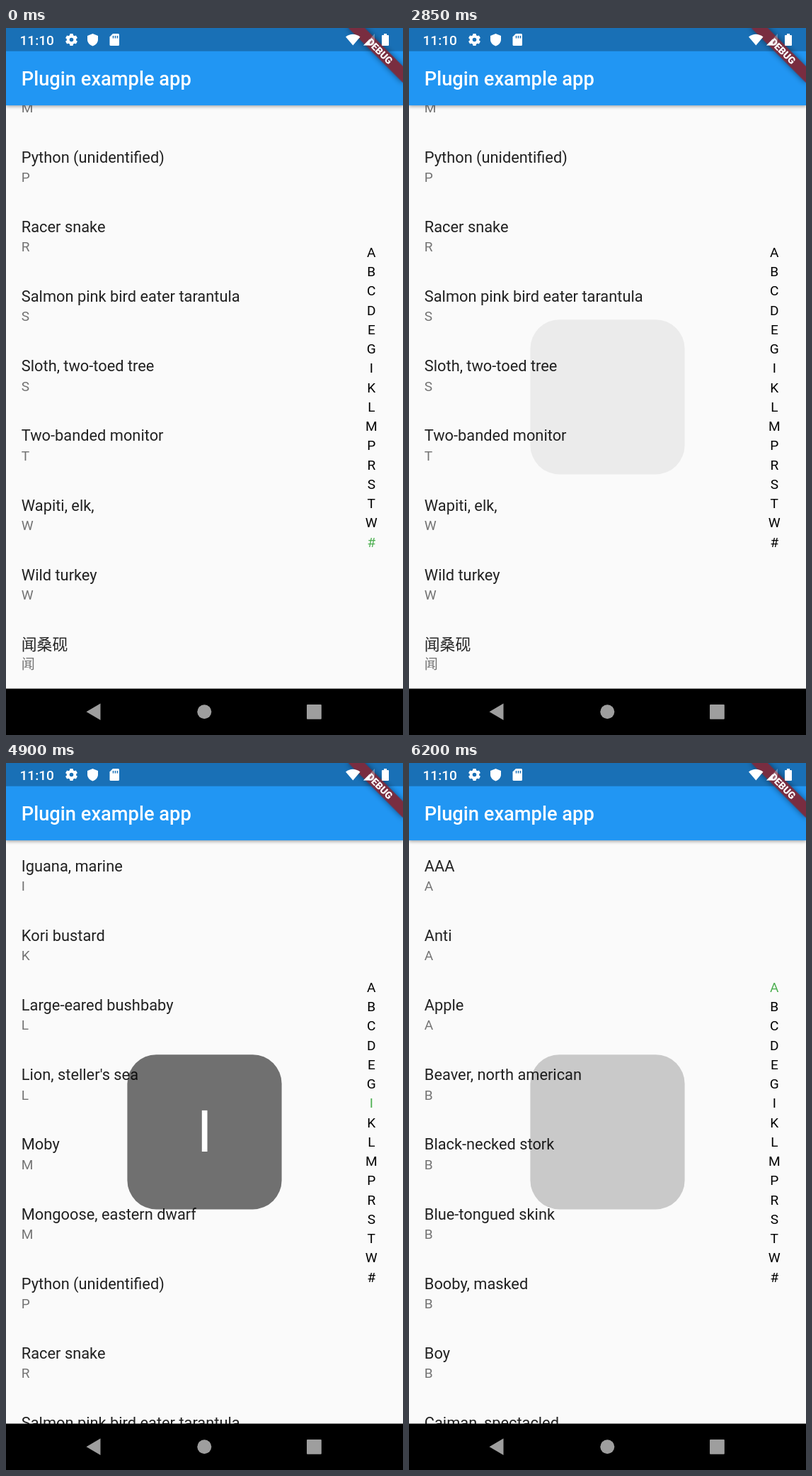
An HTML page for the animation above (6.25 s loop, 561 by 997 pixels).

```html
<!DOCTYPE html>
<html lang="zh-CN">
<head>
<meta charset="utf-8">
<title>Indexed list</title>
<style>
html, body { margin: 0; width: 100%; height: 100%; overflow: hidden; background: #fafafa; }
svg { display: block; width: 561px; height: 997px; }
text { font-family: Roboto, "Noto Sans CJK SC", "Noto Sans CJK", sans-serif; }
.title { font-size: 21.82px; fill: rgba(0,0,0,.87); }
.sub { font-size: 19.09px; fill: rgba(0,0,0,.54); }
.mid { text-anchor: middle; }
#index { font-size: 19.09px; }
#bar { filter: drop-shadow(0 2px 2px rgba(0,0,0,.3)); }
#band { filter: drop-shadow(0 0 4px rgba(0,0,0,.5)); }
</style>
</head>
<body>
<svg viewBox="0 0 561 997">
  <rect width="561" height="997" fill="#fafafa"/>
  <g id="list"></g>
  <g id="index" class="mid"></g>
  <g id="popup">
    <rect x="171.4" y="411.2" width="218.2" height="218.2" rx="41" fill="#000" fill-opacity=".55"/>
  </g>
  <text id="letter" class="mid" x="280.5" y="548.3" font-size="81.8" fill="#fff"></text>

  <rect id="bar" y="-9" width="561" height="118.1" fill="#2196f3"/>
  <rect width="561" height="32.7" fill="#1970b6"/>
  <text x="21.8" y="80.7" font-size="27.27" font-weight="500" fill="#fff">Plugin example app</text>

  <g transform="translate(561 0) rotate(45)">
    <rect id="band" x="-54.5" y="38.2" width="109" height="16.4" fill="#792d40"/>
    <text class="mid" y="51.3" font-size="13.9" font-weight="900" fill="#fff">DEBUG</text>
  </g>

  <g fill="#fff">
    <text x="19.5" y="24" font-size="19.09" font-weight="500">11:10</text>
    <circle cx="92.5" cy="16.5" r="4.8" fill="none" stroke="#fff" stroke-width="4"/>
    <g id="gear"></g>
    <path d="M122.5 8l7.5 3v5c0 4.5-3 8-7.5 9.500c-4.500-1.500-7.500-5-7.500-9.500v-5z"/>
    <path d="M151 8h7.500q1.500 0 1.500 1.500v14q0 1.500-1.500 1.500h-10.500q-1.500 0-1.500-1.500v-11z"/>
    <path d="M151.500 11v3.500m3-3.500v3.500m3-3.500v3.500" stroke="#1970b6" stroke-width="1.500"/>
    <path d="M480 12.500q10-7.500 20.500 0l-10.200 12z"/>
    <path d="M521 8v16.500h-16z" opacity=".3"/>
    <path d="M514 15.500v9h-9z"/>
    <path d="M534 8h4v2h2q1 0 1 1v13q0 1-1 1h-8q-1 0-1-1v-13q0-1 1-1h2z"/>
  </g>

  <rect y="931.6" width="561" height="65.400"/>
  <g fill="#9e9e9e">
    <path d="M113.500 964.300l20-11.800v23.600z"/>
    <circle cx="280.300" cy="964.300" r="10"/>
    <rect x="425" y="954" width="20.800" height="20.800" rx="1"/>
  </g>
</svg>
<script>
const LOOP = 6250, TOP = 109.09, ROW = 98.18, VIEW = 822.45, LAG = 45;
const FADE_IN = 2830, RELEASE = 6072, FADE = 200;
const letters = [...'ABCDEGIKLMPRSTW#'];
const names = `AAA|Anti|Apple|Beaver, north american|Black-necked stork|Blue-tongued skink|Booby, masked|Boy|\
Caiman, spectacled|Cat|Cereopsis goose|Cherry|Cliffchat, mocking|Common ringtail|Crane, wattled|Dog, raccoon|\
Eastern fox squirrel|Gray langur|Iguana, marine|Kori bustard|Large-eared bushbaby|Lion, steller's sea|Moby|\
Mongoose, eastern dwarf|Python (unidentified)|Racer snake|Salmon pink bird eater tarantula|\
Sloth, two-toed tree|Two-banded monitor|Wapiti, elk,|Wild turkey|闻桑砚`.split('|');

// Letter under the finger from each moment on
const drag = [[0, '#'], [FADE_IN, ''], [2930, '#'], [3030, 'W'], [3100, 'T'], [3180, 'S'], [3270, 'R'],
  [3370, 'P'], [3530, 'M'], [3860, 'L'], [3980, 'K'], [4100, 'I'], [4430, 'P'], [4620, 'M'], [4700, 'L'],
  [4770, 'K'], [4840, 'I'], [4920, 'G'], [4990, 'E'], [5070, 'D'], [5160, 'C'], [5480, 'B'], [5700, 'A']];

const $ = id => document.getElementById(id);
function add(parent, tag, attrs, text = '') {
  const el = document.createElementNS('http://www.w3.org/2000/svg', tag);
  for (const key in attrs) el.setAttribute(key, attrs[key]);
  el.textContent = text;
  return parent.appendChild(el);
}

names.forEach((name, i) => {
  const y = TOP + i * ROW;
  add($('list'), 'text', { class: 'title', x: 21.8, y: y + 43.64 }, name);
  add($('list'), 'text', { class: 'sub', x: 21.8, y: y + 70.9 }, name[0]);
});
const keys = letters.map((c, i) => add($('index'), 'text', { x: 516.3, y: 322.7 + i * 27.27 }, c));
for (let a = 0; a < 360; a += 60)
  add($('gear'), 'rect', { x: 90.2, y: 8, width: 4.6, height: 4, rx: .8, transform: `rotate(${a} 92.5 16.5)` });

const letterAt = t => drag.findLast(step => step[0] <= Math.max(t, 0))[1];
const clamp = v => Math.min(1, Math.max(0, v));

function scrollFor(letter) {
  const max = names.length * ROW - VIEW;
  const row = names.findIndex(name => name[0] === letter);
  return row < 0 ? max : Math.min(row * ROW, max);
}

function draw(now) {
  const t = now % LOOP, active = letterAt(t);
  const shown = clamp((t - FADE_IN) / FADE) * clamp(1 - (t - RELEASE) / FADE);
  keys.forEach((key, i) => key.setAttribute('fill', letters[i] === active ? '#4caf50' : '#000'));
  $('list').setAttribute('transform', `translate(0 ${-scrollFor(letterAt(t - LAG))})`);
  $('popup').setAttribute('opacity', shown);
  $('letter').textContent = t > FADE_IN && t < RELEASE ? active : '';
  requestAnimationFrame(draw);
}
requestAnimationFrame(draw);
</script>
</body>
</html>
```
